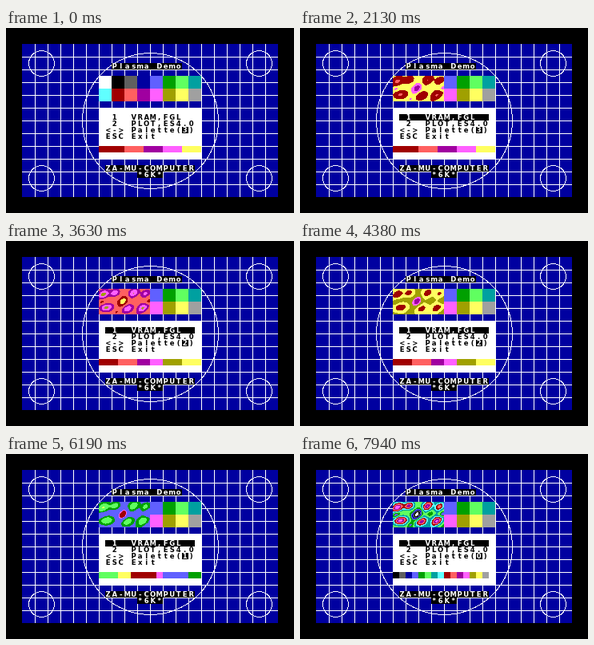
These frames come from a looping animation (360x232 px, 8000 ms). An HTML page with a canvas:

```html
<!DOCTYPE html>
<html lang="en">
<head>
<meta charset="utf-8">
<title>Plasma Demo</title>
<style>
html, body { margin: 0; width: 100%; height: 100%; overflow: hidden; background: #000; }
svg, canvas { position: absolute; left: 0; top: 0; display: block; }
canvas { left: 116px; top: 60px; image-rendering: pixelated; }
text { font: bold 8.5px "DejaVu Sans", sans-serif; text-anchor: middle; }
circle { fill: none; stroke: #fff; stroke-width: 1; shape-rendering: crispEdges; }
</style>
</head>
<body>
<svg id="stage" width="360" height="232" viewBox="0 0 360 232"></svg>
<canvas id="plasma" width="64" height="32"></canvas>
<script>
const LOOP = 8000, STEP = 62.5, CELL = 8;
const COLORS = [
  '#000000', '#606060', '#0000a0', '#6060ff', '#00a000', '#60ff60', '#00a0a0', '#60ffff',
  '#a00000', '#ff6060', '#a000a0', '#ff60ff', '#a0a000', '#ffff60', '#a0a0a0', '#ffffff'
];
const WHITE = '#ffffff', BLACK = '#000000', BLUE = COLORS[2];

// Each palette is a list of [color, run length] adding up to 16.
const expand = runs => runs.flatMap(([color, n]) => Array(n).fill(color));
const PALETTES = [
  COLORS.map((c, i) => i),
  expand([[5, 3], [13, 2], [8, 4], [11, 1], [3, 4], [4, 2]]),
  expand([[8, 3], [9, 3], [10, 2], [11, 2], [12, 3], [13, 3]]),
  expand([[8, 4], [9, 3], [10, 3], [11, 3], [13, 3]])
];

// One scene per palette: first step, first plasma step, phase offset.
const SCENES = [
  { palette: 3, from: 0, run: 22, shift: 10 },
  { palette: 2, from: 51, run: 52, shift: 0 },
  { palette: 1, from: 81, run: 83, shift: 6.3 },
  { palette: 0, from: 113, run: 115, shift: 7 }
];
const HIGHLIGHT_STEP = 21;
const CYCLE_RATE = 2;

const stage = document.getElementById('stage');

function add(name, attrs, text) {
  const el = document.createElementNS('http://www.w3.org/2000/svg', name);
  for (const key in attrs) el.setAttribute(key, attrs[key]);
  if (text !== undefined) el.textContent = text;
  stage.appendChild(el);
  return el;
}
const box = (x, y, width, height, fill) => add('rect', { x, y, width, height, fill });
const ring = (cx, cy, r) => add('circle', { cx, cy, r });

// Text sits on a grid of character cells.
function label(x, y, text, fill = BLACK) {
  const xs = [...text].map((c, i) => x + i * CELL + 3.7).join(' ');
  return add('text', { x: xs, y: y + 7, fill }, text);
}

function banner(x, y, text) {
  box(x, y, text.length * CELL, CELL, BLACK);
  label(x, y, text, WHITE);
}

// Test card
box(0, 0, 360, 232, BLACK);
box(20, 20, 320, 192, BLUE);
for (let x = 36; x < 340; x += 16) box(x, 20, 1, 192, WHITE);
for (let y = 36; y < 212; y += 16) box(20, y, 320, 1, WHITE);
for (const x of [44.5, 316.5]) for (const y of [44.5, 188.5]) ring(x, y, 16);
ring(180.5, 116.5, 85);

banner(132, 44, 'Plasma Demo');
for (let i = 0; i < 16; i++) {
  box(116 + i % 8 * 16, 60 + (i >> 3) * 16, 16, 16, COLORS[(i + 15) % 16]);
}

// Menu
box(116, 100, 128, 64, WHITE);
const bar = box(124, 108, 112, 8, BLACK);
const first = [label(132, 108, '1'), label(156, 108, 'VRAM,FGL')];
label(132, 116, '2');
label(156, 116, 'PLOT,ES4.0');
label(124, 124, '<->');
label(156, 124, 'Palette(');
box(220, 124, 8, 8, BLACK);
const digit = label(220, 124, '3', WHITE);
label(228, 124, ')');
label(124, 132, 'ESC');
label(156, 132, 'Exit');
const swatches = PALETTES[0].map((c, i) => box(116 + i * 8, 148, 8, 8, COLORS[c]));
banner(124, 172, 'ZA-MU-COMPUTER');
banner(164, 180, '*6K*');

// Plasma height map: center x, y, radii and height of each slanted hill
const HILLS = [
  [5, 7, 6, 5, 6], [20, 4, 5, 4.5, 5.5], [43, 5, 6, 5, 6], [57, 6, 4.5, 4.5, 4.5],
  [9, 23, 7, 5, 6.2], [36, 24, 6, 5, 6], [54, 24, 5.5, 5, 5.5],
  [30, 14.5, 5, 6, -7], [3, 16, 4, 3, -3], [46, 15, 4, 3, -1.5],
  [22, 28, 4, 4, -2.5], [62, 15, 4, 3, -3]
];
const SLANT = 0.45;
const W = 64, H = 32;
const field = Array.from({ length: W * H }, (_, i) => {
  const x = i % W, y = Math.floor(i / W);
  let v = 0.5 * Math.sin(x / 5 + y / 7) + 0.4 * Math.cos(y / 3 - x / 9);
  for (const [cx, cy, rx, ry, h] of HILLS) {
    const dx = x - cx + SLANT * (y - cy), dy = y - cy;
    v += h * Math.exp(-((dx / rx) ** 2 + (dy / ry) ** 2) * 0.8);
  }
  return v;
});

const canvas = document.getElementById('plasma');
const ctx = canvas.getContext('2d');
const image = ctx.createImageData(W, H);
const RGB = COLORS.map(c => [1, 3, 5].map(i => parseInt(c.slice(i, i + 2), 16)));

function drawPlasma(palette, phase) {
  field.forEach((v, i) => {
    const index = ((Math.floor(v + phase + 0.5) % 16) + 16) % 16;
    image.data.set([...RGB[palette[index]], 255], i * 4);
  });
  ctx.putImageData(image, 0, 0);
}

function render(ms) {
  const step = Math.floor((ms % LOOP + 5) / STEP) % 128;
  const scene = SCENES.filter(s => s.from <= step).pop();
  const palette = PALETTES[scene.palette];
  const lit = step >= HIGHLIGHT_STEP;
  bar.setAttribute('visibility', lit ? 'visible' : 'hidden');
  first.forEach(el => el.setAttribute('fill', lit ? WHITE : BLACK));
  digit.textContent = scene.palette;
  swatches.forEach((el, i) => el.setAttribute('fill', COLORS[palette[i]]));
  const running = step >= scene.run;
  canvas.style.visibility = running ? 'visible' : 'hidden';
  if (running) drawPlasma(palette, step * CYCLE_RATE + scene.shift);
}

const start = performance.now();
function tick() {
  render(performance.now() - start);
  requestAnimationFrame(tick);
}
tick();
</script>
</body>
</html>
```
